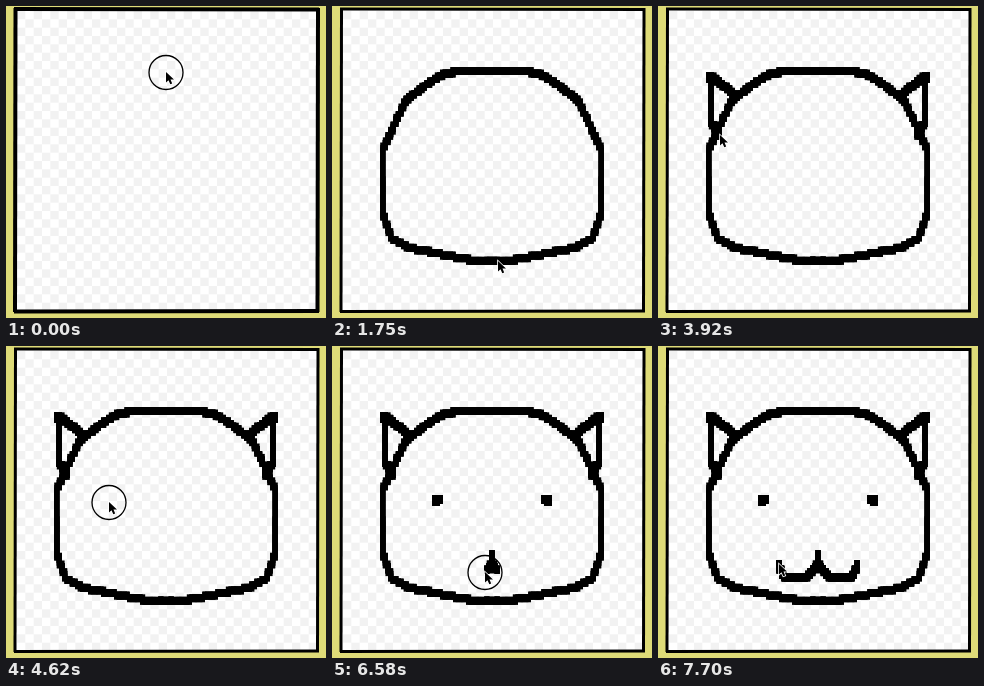
An HTML page with a canvas for the animation above (8000 ms loop, 320x312 px).

```html
<!DOCTYPE html>
<html lang="en">
<head>
<meta charset="utf-8">
<title>Mirror drawing</title>
<style>
html, body { margin: 0; width: 100%; height: 100%; overflow: hidden; background: #dedb78; }
canvas { display: block; }
</style>
</head>
<body>
<canvas id="stage" width="320" height="312"></canvas>
<script>
const ctx = document.getElementById('stage').getContext('2d');
const LOOP = 8000, STEP = 70, AXIS = 160, PIXEL = 2.6;

// Pointer route, one leg per stroke or move: [step, x, y]
const head = [
  [0, 160, 66], [3, 122, 66], [4.2, 110, 69], [5.5, 97, 77], [8, 74, 94],
  [12, 52, 141], [13, 50, 172], [15, 51, 208], [17, 60, 233],
  [18.5, 78, 242], [23, 148, 256], [24, 166, 256], [25, 166, 255]
];
const ear = [[35, 77, 89], [36, 71, 84], [40, 52, 69], [47, 53, 116], [52, 60, 126], [53, 62, 129]];
const roam = [[56, 62, 129], [61, 238, 152]];
const eye = [[66, 103, 156], [68, 103, 153], [70, 108, 153], [72, 104, 157]];
const hover = [[75, 104, 157], [79, 158, 207], [82, 155, 206], [85, 160, 209]];
const mouth = [
  [88, 160, 209], [91, 160, 218], [94, 153, 226], [96, 147, 232],
  [99, 129, 232], [101, 123, 228], [103, 122, 221], [109, 121, 218]
];
const route = [head, ear, roam, eye, hover, mouth].flat();
const strokes = [head, ear, eye, mouth];

function pointerAt(step) {
  const next = route.findIndex(key => key[0] > step);
  const [t1, x1, y1] = route.at(next);
  const [t0, x0, y0] = next < 0 ? route.at(-2) : route[next - 1];
  const k = next < 0 ? 1 : (step - t0) / (t1 - t0);
  const pen = strokes.some(s => step >= s[0][0] && step < s.at(-1)[0]);
  return { x: x0 + (x1 - x0) * k, y: y0 + (y1 - y0) * k, pen };
}

const snap = v => Math.round(v / PIXEL) * PIXEL;

function stamp(x, y) {
  const dx = snap(AXIS - x), top = snap(y) - 1.5 * PIXEL;
  for (const cx of [AXIS - dx, AXIS + dx]) {
    ctx.fillRect(cx - PIXEL, top, 2 * PIXEL, 3 * PIXEL);
  }
}

function edge(x0, y0, x1, y1) {
  ctx.beginPath();
  ctx.moveTo(x0, y0);
  ctx.lineTo(x1, y1);
  ctx.stroke();
}

function drawPaper(step) {
  ctx.fillStyle = '#dedb78';
  ctx.fillRect(0, 0, 320, 312);
  ctx.fillStyle = '#fff';
  ctx.fillRect(10, 4, 302, 302);
  ctx.fillStyle = '#f2f2f2';
  const count = 36, cell = 300 / count;
  for (let row = 0; row < count; row++) {
    for (let col = row % 2; col < count; col += 2) {
      ctx.fillRect(11 + col * cell, 5 + row * cell, cell, cell);
    }
  }
  ctx.strokeStyle = '#000';
  ctx.lineWidth = step < 1 ? 4 : 3;
  edge(8, 3, 313, 3.5);
  edge(312, 2, 311.5, 306);
  edge(313, 305, 8, 305.5);
  edge(9.5, 2, 9, 306);
}

function drawPointer({ x, y, pen }) {
  if (pen) {
    ctx.beginPath();
    ctx.arc(x, y + 0.5, 17, 0, 2 * Math.PI);
    ctx.lineWidth = 1.3;
    ctx.stroke();
  }
  ctx.save();
  ctx.translate(x, y);
  const arrow = new Path2D('M0 0V10.5L2.5 8.3L4.3 12.3L6.2 11.5L4.5 7.6H8Z');
  ctx.strokeStyle = '#fff';
  ctx.lineWidth = 1.6;
  ctx.stroke(arrow);
  ctx.fill(arrow);
  ctx.restore();
}

function draw(now) {
  const step = Math.floor(now % LOOP / STEP);
  drawPaper(step);
  ctx.fillStyle = '#000';
  // Ink trails the pointer by one step
  for (let s = 0; s <= step - 1; s += 1 / 16) {
    const p = pointerAt(s);
    if (p.pen) stamp(p.x, p.y);
  }
  drawPointer(pointerAt(step));
  requestAnimationFrame(draw);
}

requestAnimationFrame(draw);
</script>
</body>
</html>
```
